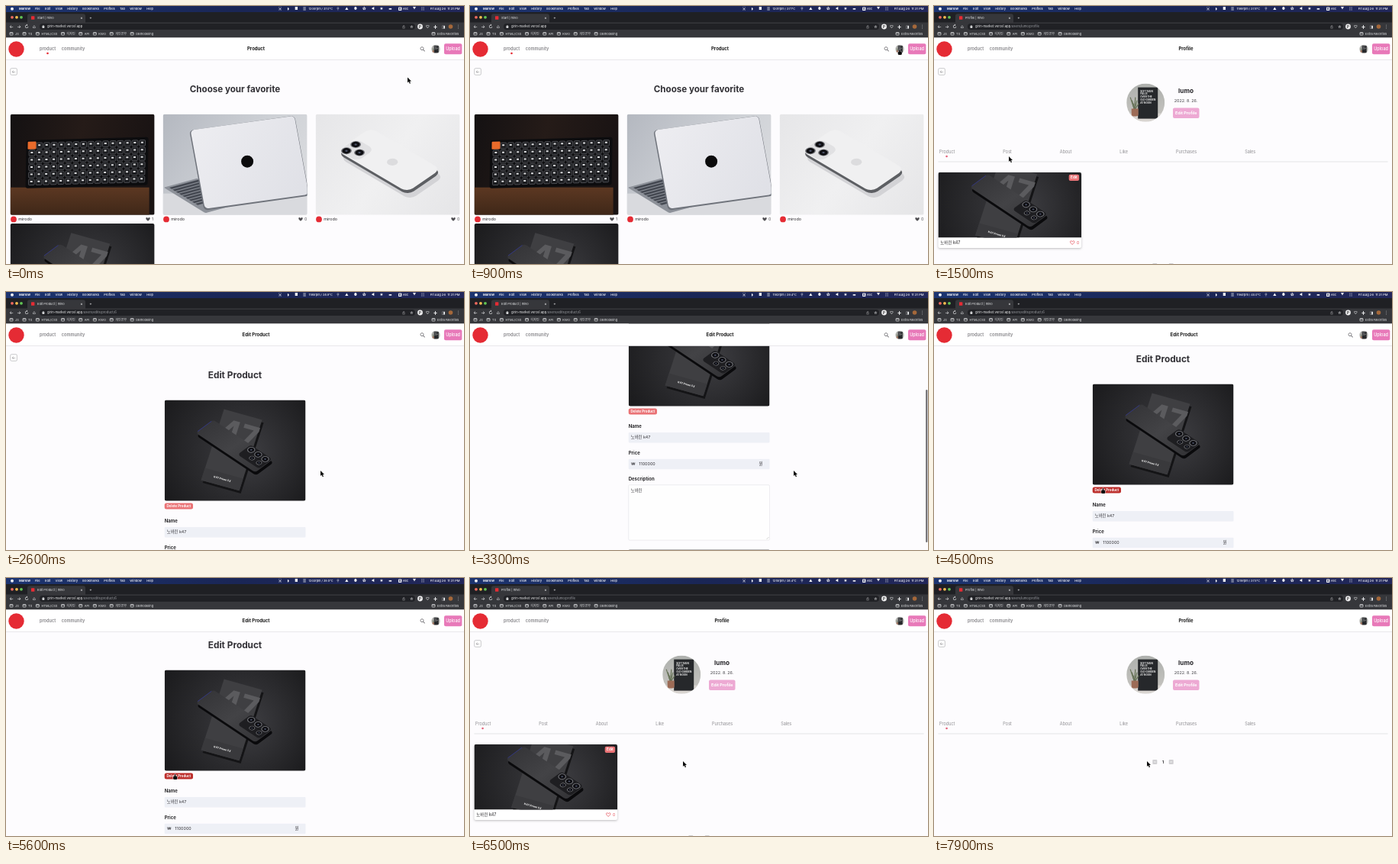
Write an HTML page with a canvas that moves like this. It is 600 px wide and 338 px high and loops after 8 s.

```html
<!DOCTYPE html>
<html lang="en">
<head>
<meta charset="utf-8">
<title>Market walkthrough</title>
<style>
html, body { margin: 0; width: 100%; height: 100%; overflow: hidden; background: #fdfcfe; }
canvas { display: block; width: 600px; height: 338px; }
</style>
</head>
<body>
<canvas id="stage" width="600" height="338"></canvas>
<script>
const g = document.getElementById('stage').getContext('2d');
const LOOP = 8000, TAU = Math.PI * 2;
const FONT = 'Inter, "Noto Sans CJK KR", "Noto Sans CJK", "DejaVu Sans", sans-serif';
const BG = '#fdfcfe', RED = '#e52b34', PINK = '#e879b9', CORAL = '#ea7376';
const INK = '#29282b', SOFT = '#858488', LIGHT = '#e4e5e7', FIELD = '#eef0f6';
const BRAND = '노바린', ITEM = BRAND + ' k47', SELLER = 'mirodo', USER = 'lumo';

function text(s, x, y, size, color, weight = 400, align = 'left') {
  g.font = `${weight} ${size}px ${FONT}`;
  g.textAlign = align;
  g.textBaseline = 'middle';
  g.fillStyle = color;
  g.fillText(s, x, y);
  return g.measureText(s).width;
}
// Words in a line with equal gaps between them
function row(words, x, gap, y, size, color, weight, mark) {
  for (const s of words) {
    if (mark) mark(x, y);
    x += text(s, x, y, size, color, weight) + gap;
  }
}
// Single signs on an even pitch
function signs(list, x, pitch, y, size, color) {
  [...list].forEach((s, i) => text(s, x + i * pitch, y, size, color, 500, 'center'));
}
function rect(x, y, w, h, color) {
  g.fillStyle = color;
  g.fillRect(x, y, w, h);
}
function paint(fill, stroke, width = .7) {
  if (fill) { g.fillStyle = fill; g.fill(); }
  if (stroke) { g.strokeStyle = stroke; g.lineWidth = width; g.stroke(); }
}
function round(x, y, w, h, r, fill, stroke) {
  g.beginPath();
  g.roundRect(x, y, w, h, r);
  paint(fill, stroke);
}
function disc(x, y, r, fill, stroke, width) {
  g.beginPath();
  g.arc(x, y, r, 0, TAU);
  paint(fill, stroke, width);
}
function line(color, width, ...pts) {
  g.beginPath();
  for (let i = 0; i < pts.length; i += 2) g.lineTo(pts[i], pts[i + 1]);
  paint(null, color, width);
}
function fade(x0, y0, x1, y1, ...colors) {
  const f = g.createLinearGradient(x0, y0, x1, y1);
  colors.forEach((c, i) => f.addColorStop(i / (colors.length - 1), c));
  return f;
}
// Draws inside a rounded box, with the origin at its corner
function photo(x, y, w, h, r, draw) {
  g.save();
  g.beginPath();
  g.roundRect(x, y, w, h, r);
  g.clip();
  g.translate(x, y);
  draw(w, h);
  g.restore();
}
// Draws on a tilted plane spanned by two edges, in lengths along them
function slab(x, y, ax, ay, bx, by, draw) {
  const w = Math.hypot(ax, ay), h = Math.hypot(bx, by);
  g.save();
  g.transform(ax / w, ay / w, bx / h, by / h, x, y);
  draw(w, h);
  g.restore();
}
function lens(x, y, r) {
  disc(x, y, r, '#77787d');
  disc(x, y, r * .8, '#0e0e12');
  disc(x, y, r * .25, '#4b5268');
}
function heart(x, y, fill, stroke) {
  g.beginPath();
  g.moveTo(x, y + 2.4);
  g.bezierCurveTo(x - 5, y - 1, x - 1.8, y - 4, x, y - 1.2);
  g.bezierCurveTo(x + 1.8, y - 4, x + 5, y - 1, x, y + 2.4);
  paint(fill, stroke);
}

function keyboard(w, h) {
  rect(0, 0, w, h, fade(0, 0, w, 40, '#141112', '#251b18', '#191313'));
  rect(0, 96, 182, 36, fade(0, 96, 0, 132, '#5c3822', '#3f2718'));
  slab(24, 37, 154, -4, -1, 57, (kw, kh) => {
    round(-3, -3, kw + 6, kh + 6, 3, '#0c0c0e');
    const dx = kw / 16, dy = kh / 6;
    for (let i = 0; i < 96; i++) {
      const x = i % 16 * dx, y = Math.floor(i / 16) * dy;
      round(x + .8, y + .8, dx - 1.8, dy - 1.8, 1.2, '#1b1c1f', '#626469');
      rect(x + 3, y + 3, 3, 2, '#d9dadc');
    }
    round(-1, -1, 11, 10, 1, '#e96b2b');
  });
}
function laptop(w, h) {
  rect(0, 0, w, h, fade(0, 0, w, h, '#b4b8c0', '#cdd0d5', '#dedfe2'));
  rect(0, 104, w, 28, '#d9dade');
  slab(1, 96, 44, -12, 52, 32, (bw, bh) => {
    round(0, 0, bw, bh + 3, 2, '#8d9199');
    for (let i = 0; i < 9; i++) rect(5, 3 + i * 5, bw - 6, 3.6, '#454952');
  });
  slab(36, 21, 136, -19, 19, 103, (lw, lh) => {
    round(-1.5, 0, lw + 2, lh + 2, 5, '#70747c');
    round(0, 0, lw, lh, 5, fade(0, 0, lw, lh, '#ededf1', '#dfe0e6'));
  });
  disc(110.5, 62, 8, '#0b0b0c');
}
function whitePhone(w, h) {
  rect(0, 0, w, h, fade(0, 0, w, h, '#e6e6e8', '#f0f0f1', '#e5e5e7'));
  const body = (dx, dy, draw) => slab(72 + dx, 18 + dy, 92, 54, -44, 30, draw);
  body(4, 10, (pw, ph) => round(0, 0, pw, ph, 9, '#d3d3d6'));
  body(1, 4, (pw, ph) => round(0, 0, pw, ph, 9, '#5d5f63'));
  body(0, 0, (pw, ph) => {
    round(0, 0, pw, ph, 9, '#f0f0f1');
    round(1, 24, 28, 28, 8, '#e1e1e3');
    for (let i = 0; i < 3; i++) lens(12 + 8.5 * Math.cos(i * TAU / 3), 39 + 8.5 * Math.sin(i * TAU / 3), 5.8);
    disc(pw * .55, ph / 2, 6, '#dcdcde');
  });
}
function blackPhone(w) {
  g.scale(w / 185, w / 185);
  const glow = g.createRadialGradient(110, 70, 5, 95, 65, 115);
  glow.addColorStop(0, '#3c3c40');
  glow.addColorStop(1, '#1a1a1c');
  rect(0, 0, 185, 135, glow);
  slab(78, 12, 50, 14, -30, 93, (bw, bh) => {
    rect(3, 3, bw, bh, '#141416');
    rect(0, 0, bw, bh, '#3f3f42');
    text('47', bw * .55, 28, 40, '#5b5b5e', 800, 'center');
    rect(0, bh * .83, bw, bh * .17, '#39393c');
    text('K47 Prime 5X', bw / 2, bh * .91, 3.5, '#f4f4f4', 700, 'center');
  });
  const body = (dx, dy, draw) => slab(64 + dx, 26 + dy, 78, 52, -23, 17, draw);
  body(1, 4, (pw, ph) => round(0, 0, pw, ph, 4, '#0a0a0c'));
  body(0, 0, (pw, ph) => {
    round(0, 0, pw, ph, 4, fade(0, 0, pw, 0, '#363639', '#434346', '#343437'));
    line('#34398a', .8, 0, 3, 0, ph - 3);
    round(pw * .63, 0, pw * .36, ph * .75, 4, '#1e1e21');
    for (let i = 0; i < 5; i++) {
      const low = i > 2 ? 1 : 0;
      lens(65 + i % 3 * 11 + low * 10, 5.5 + low * 9, 4.5 - low * 1.2);
    }
  });
}
function portrait(x, y, r) {
  photo(x - r, y - r, 2 * r, 2 * r, r, () => {
    g.scale(r / 25, r / 25);
    rect(0, 0, 50, 50, fade(0, 0, 0, 40, '#aeb0ad', '#c3c2be'));
    rect(0, 39, 50, 11, '#d9d5d1');
    rect(15, 5, 26, 41, '#26282b');
    ['SOFT RAIN', 'FALLS', 'OVER THE', 'OLD GARDEN', 'AT NOON'].forEach((s, i) =>
      text(s, 18, 10 + i * 3.9, 3.1, '#eee', 700));
    for (let i = 0; i < 6; i++) line('#667257', 1.2, 10.5, 35, 5 + i * 2.2, 18 + i % 3 * 4);
    round(6.5, 33, 9, 10, [0, 0, 3, 3], '#9c6b56');
  });
}

function folder(x, y) {
  round(x - 7, y - 1.8, 4, 3.4, .5, null, LIGHT);
  line(LIGHT, .6, x - 7, y - .8, x - 3, y - .8);
}
function sensor(t) {
  const s = Math.floor(t / 500) / 2;
  const rpm = 1200 - 2.6 * s * Math.sin((s - 1.3) / 3.9 * Math.PI);
  const heat = 38.5 - 1.5 * Math.cos(s / 8.6 * TAU);
  return `${Math.round(rpm)}rpm / ${heat.toFixed(1)}°C`;
}
function menuBar(t) {
  const c = '#f1f2f6', y = 3.7;
  rect(0, 0, 600, 8, fade(0, 0, 600, 0, '#1c3470', '#1a2656', '#22275a'));
  disc(8, y, 2, c);
  const w = text('Marlow', 17, y, 4.1, c, 700);
  row(['File', 'Edit', 'View', 'History', 'Bookmarks', 'Profiles', 'Tab', 'Window', 'Help'],
    23 + w, 6.3, y, 4, c, 500);
  signs('▣◗■▦', 359, 10.7, y, 4.6, c);
  text(sensor(t), 396.5, y, 3.8, c, 500);
  signs('⚲▲●✿◀✱▬', 435, 11.4, y, 4.6, c);
  round(514, 1.4, 4.4, 4.6, .8, c);
  text('A', 516.2, y + .1, 3.6, '#222956', 700, 'center');
  text('ABC', 520, y, 3.4, c, 500);
  signs('▼▤', 535, 11, y, 4.4, c);
  text('Fri Aug 26  11:31 PM', 594.5, y, 4.1, c, 500, 'right');
}
function browser(title, route) {
  rect(0, 8, 600, 14, '#1f2024');
  ['#ee6a5f', '#f5bd4f', '#61c554'].forEach((c, i) => disc(8 + i * 6, 14.8, 1.9, c));
  round(28, 10.3, 76, 13, [3, 3, 0, 0], '#36373b');
  round(33, 13.3, 4.4, 4.4, .5, RED);
  text(title + ' | mivo', 41, 15.7, 4, LIGHT);
  signs('×+', 99, 12, 15.5, 5, LIGHT);
  rect(0, 21.5, 600, 19.8, '#36373b');
  signs('←→↻⌂', 7, 10, 26.8, 6, LIGHT);
  round(44, 23, 492, 8, 4, '#202125');
  rect(47.5, 26.5, 2.8, 2.3, LIGHT);
  disc(48.9, 26.4, .9, null, LIGHT);
  const w = text('girin-market.vercel.app', 54, 27, 4.2, '#f0f1f2');
  text(route, 54 + w, 27, 4.2, '#9a9da2');
  disc(542.5, 27, 3.4, '#f0f0f1');
  text('P', 542.5, 27.2, 4.5, '#333', 700, 'center');
  signs('⎙☆ ♡✚◨', 521, 10.4, 27, 5, LIGHT);
  disc(582.5, 27, 2.8, '#a5683a');
  signs('⋮', 592.5, 0, 27, 6, LIGHT);
  row(['JS', 'TS', 'HTML/CSS', '디자인', 'API', 'KWO', '개인공부', 'DBmodeling'],
    12, 12.2, 36.4, 4, LIGHT, 400, folder);
  row(['Extra Favorites'], 565, 0, 36.4, 4, LIGHT, 400, folder);
}
function header(title, search, dot) {
  rect(0, 41.3, 600, 29, '#fff');
  rect(0, 70, 600, .8, '#e4e3e6');
  disc(13.5, 56.5, 10.2, RED);
  row(['product', 'community'], 44, 7.7, 56.3, 5.6, SOFT, 600);
  if (dot) disc(54.5, 62, 1.3, RED);
  text(title, search ? 327.5 : 330, 56.4, 6, '#161616', 700, 'center');
  if (search) {
    disc(545, 55.7, 2, null, SOFT, 1);
    line(SOFT, 1.2, 546.5, 57.2, 548.6, 59.3);
  }
  portrait(563, 56.5, 5.8);
  round(574, 49.3, 23.3, 14, 2, PINK);
  text('Upload', 585.6, 56.5, 5.5, '#fff', 500, 'center');
}
function backButton() {
  round(5.8, 81.7, 8.6, 8.6, 1.5, '#fff', '#b4b3b7');
  text('←', 10.1, 85.9, 6, SOFT, 400, 'center');
}

function productPage() {
  backButton();
  text('Choose your favorite', 300, 109.2, 11.6, '#323136', 700, 'center');
  [keyboard, laptop, whitePhone].forEach((draw, i) => {
    const x = 5.6 + i * 200;
    photo(x, 141.7, 189, 132, 2.5, draw);
    disc(x + 4.4, 279.4, 3.9, RED);
    text(SELLER, x + 10.7, 279.5, 5.4, INK);
    heart(x + 180.4, 279.4, '#504f53');
    text(i ? '0' : '1', x + 185.4, 279.6, 5.2, '#504f53');
  });
  photo(5.6, 285, 189, 132, 2.5, blackPhone);
}
function profilePage(hasItem) {
  backButton();
  portrait(277.2, 126.6, 25);
  text(USER, 330, 112, 8.2, '#252428', 700, 'center');
  text('2022. 8. 26.', 330, 124, 5.3, '#59585c', 500, 'center');
  round(313, 133.6, 34.5, 13.4, 2, '#eda9d3');
  text('Edit Profile', 330.2, 140.5, 5.4, '#fff', 700, 'center');
  row(['Product', 'Post', 'About', 'Like', 'Purchases', 'Sales'], 7, 63, 191.2, 5.5, '#8e8d91');
  disc(16.6, 197, 1.3, '#e35f78');
  rect(5.5, 203.6, 589, .8, '#dcdbde');
  if (hasItem) {
    g.save();
    g.shadowColor = 'rgba(0,0,0,.25)';
    g.shadowBlur = 3;
    g.shadowOffsetY = 1;
    round(5.5, 218, 187.5, 99, 2, '#fff');
    g.restore();
    photo(5.5, 218, 187.5, 85.3, [2, 2, 0, 0], w => { g.translate(0, -24); blackPhone(w); });
    round(176.7, 220.8, 13.4, 8.2, 2, CORAL);
    text('Edit', 183.4, 225, 4.6, '#fff', 700, 'center');
    text(ITEM, 8.3, 310, 5.5, INK);
    heart(181.2, 310, null, '#e3434e');
    text('0', 187, 310.2, 5, '#e3434e');
  }
  const y = hasItem ? 340 : 241;
  for (const side of [-1, 1]) {
    const x = 300 + side * 10.7;
    round(x - 3, y - 3, 6, 6, 1, '#d1d0d3');
    text(side < 0 ? '<' : '>', x, y, 4, '#fff', 600, 'center');
  }
  text('1', 300, y, 5, INK, 700, 'center');
}
function editPage(scroll, hover) {
  const x = 207.7, w = 184.8;
  const label = (s, y) => text(s, x, y, 6, INK, 700);
  const value = (s, dx, y) => text(s, x + dx, y, 5.4, '#36353a');
  g.save();
  g.translate(0, -scroll);
  backButton();
  text('Edit Product', 300, 109.2, 11.8, '#323136', 700, 'center');
  photo(x, 141.5, w, 132, 2.5, blackPhone);
  round(x, 276.6, 37.3, 8, 2.5, hover ? '#bd302d' : CORAL);
  text('Delete Product', x + 18.6, 280.7, 4.4, '#fff', 700, 'center');
  label('Name', 300.6);
  round(x, 308, w, 13.4, 1, FIELD);
  value(ITEM, 3, 314.8);
  label('Price', 335);
  round(x, 342.8, w, 13.4, 1, FIELD);
  value('₩', 3.6, 349.5);
  value('1100000', 13.6, 349.5);
  value('원', 170.8, 349.5);
  label('Description', 369.2);
  round(x, 376.7, w, 72.5, 1.5, '#fefefe', '#e7e6ea');
  value(BRAND, 3, 384.2);
  line('#aaa', .5, 388.5, 448, 391.5, 445);
  round(x, 461, w, 13.4, 2, '#b9b8bb');
  g.restore();
}

// Eased progress from 0 to 1 between two times
function ramp(t, from, to) {
  const p = Math.min(1, Math.max(0, (t - from) / (to - from)));
  return p * p * (3 - 2 * p);
}
const MOVES = [
  { from: 200, to: 750, x: 563, y: 57 },
  { from: 1050, to: 1500, x: 98, y: 197 },
  { from: 1550, to: 1900, x: 183, y: 224 },
  { from: 2150, to: 2600, x: 412, y: 234 },
  { from: 2700, to: 3250, x: 424, y: 234 },
  { from: 3700, to: 4350, x: 221.5, y: 257 },
  { from: 5900, to: 6400, x: 279, y: 240 }
];
function pointer(t) {
  let x = 526, y = 93.5;
  for (const m of MOVES) {
    const p = ramp(t, m.from, m.to);
    x += (m.x - x) * p;
    y += (m.y - y) * p;
  }
  return [x, y];
}
function cursor(x, y, hand) {
  g.save();
  g.translate(x, y);
  g.lineJoin = 'round';
  g.beginPath();
  if (hand) {
    g.roundRect(-.8, 0, 1.5, 5, .7);
    g.roundRect(-2.4, 2.6, 5.2, 4.4, 1.5);
  } else {
    g.lineTo(0, 0);
    g.lineTo(0, 7);
    g.lineTo(1.6, 5.6);
    g.lineTo(2.8, 8.3);
    g.lineTo(4, 7.8);
    g.lineTo(2.9, 5.2);
    g.lineTo(5, 5);
    g.closePath();
  }
  paint(null, '#fff', .9);
  paint('#0a0a0a');
  g.restore();
}

function draw(t) {
  const during = (a, b) => t >= a && t < b;
  const scroll = 124 * ramp(t, 2700, 3250) - 103 * ramp(t, 3700, 4200);
  const hand = during(700, 1100) || during(1850, 2150) || during(4280, 6050);
  let title = 'Profile', tab = title, route = `/users/${USER}/profile`;
  rect(0, 0, 600, 338, BG);
  if (t < 1100) {
    title = 'Product';
    tab = 'Start';
    route = '';
    productPage();
  } else if (during(2150, 6050)) {
    title = tab = 'Edit Product';
    route = '/users/edits/product/6';
    editPage(scroll, hand);
  } else {
    profilePage(t < 7200);
  }
  header(title, title != 'Profile', title == 'Product');
  browser(tab, route);
  menuBar(t);
  if (during(2750, 4400)) round(597, 44 + scroll * .677, 2.4, 200, 1.2, '#77767a');
  cursor(...pointer(t), hand);
}
function tick(now) {
  draw(now % LOOP);
  requestAnimationFrame(tick);
}
requestAnimationFrame(tick);
</script>
</body>
</html>
```
